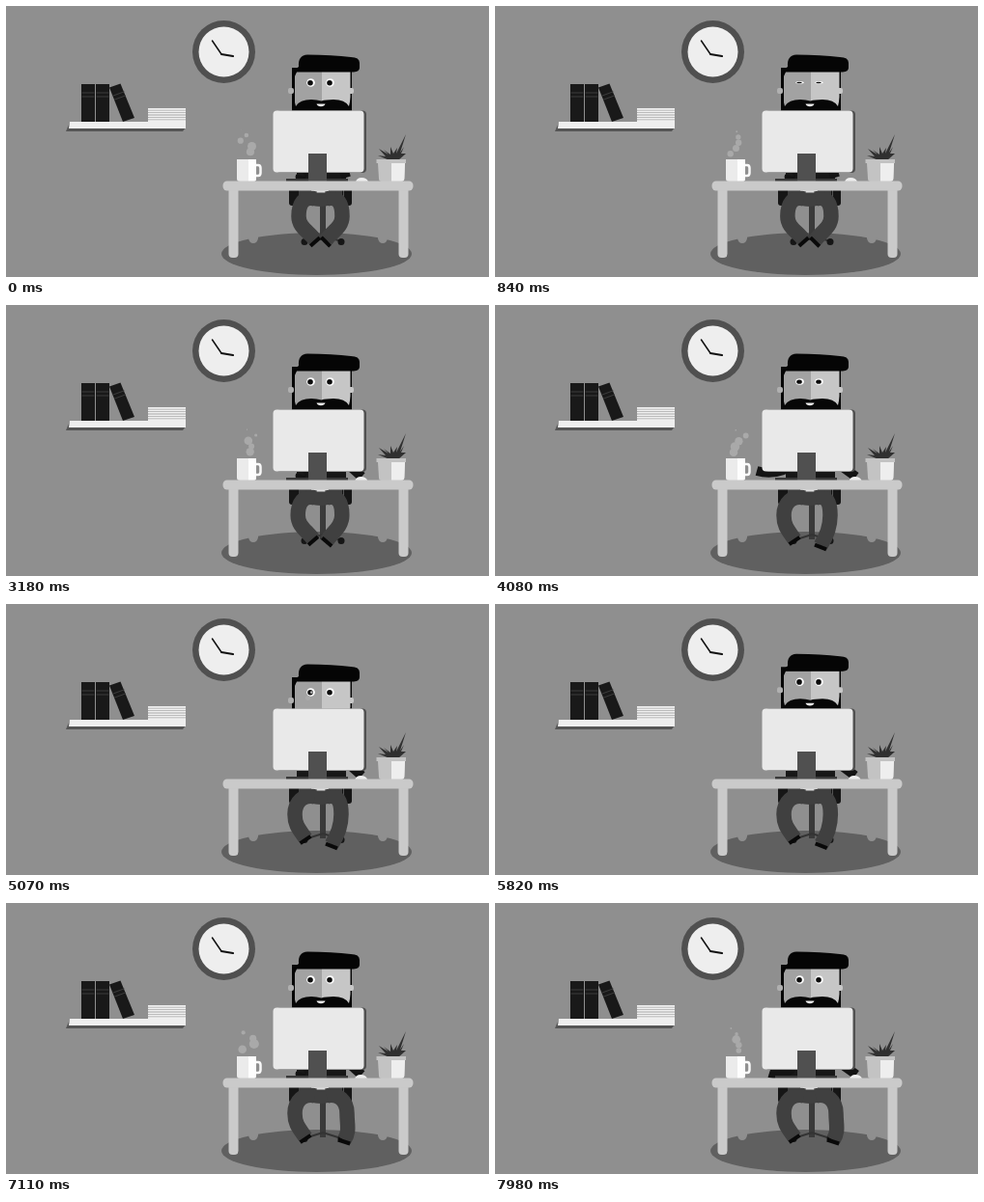
An HTML page for the animation above (8 s loop, 500 by 281 pixels).

```html
<!DOCTYPE html>
<html lang="en">
<head>
<meta charset="utf-8">
<title>At the desk</title>
<style>
html, body { margin: 0; width: 100%; height: 100%; overflow: hidden; background: #8f8f8f; }
svg { display: block; width: 100vw; height: 100vh; }
.line { fill: none; stroke-linecap: round; }
.sleeve { fill: none; stroke: #131313; stroke-width: 10; }
.trouser { fill: none; stroke: #404040; stroke-width: 15.5; }
.shoe { stroke: #090909; stroke-width: 4; }
</style>
</head>
<body>
<svg viewBox="0 0 500 281">
  <ellipse cx="321.500" cy="257" rx="98.500" ry="22" fill="#606060"/>

  <g id="clock">
    <circle cx="225.500" cy="47.500" r="32.500" fill="#505050"/>
    <circle cx="225.500" cy="47.500" r="26" fill="#eee"/>
    <path class="line" d="M223 50L213.500 36" stroke="#111" stroke-width="1.500"/>
    <path class="line" d="M223 50L235 52" stroke="#111" stroke-width="2"/>
  </g>

  <g id="shelf">
    <path d="M66 121L62 130H183L186 126Z" fill="#555"/>
    <path d="M66 120H186V127H65Z" fill="#eee"/>
    <path id="book" d="M78 81H92V120H78Z" fill="#191919"/>
    <use href="#book" x="15"/>
    <path d="M107 84.500L118.500 80.500L133 116L121 120Z" fill="#191919"/>
    <path class="line" d="M79 90H91M79 94H91M94 90H106M94 94H106M111 93L122 89M112.500 97L123.500 93" stroke="#3c3c3c"/>
    <path d="M147.500 106H186V120H147.500Z" fill="#a8a8a8"/>
    <path d="M166.500 106V120" stroke="#f0f0f0" stroke-width="39" stroke-dasharray="1.700 .760"/>
  </g>

  <g id="chair">
    <path d="M325 204H331V243H325Z" fill="#3a3a3a"/>
    <path class="line" d="M309 244L328 238L347 244" stroke="#333" stroke-width="2"/>
    <circle cx="309" cy="244.500" r="3.500" fill="#161616"/>
    <circle cx="347" cy="244.500" r="3.500" fill="#161616"/>
    <path d="M293 186H358V204Q358 207 355 207H296Q293 207 293 204Z" fill="#161616"/>
    <path d="M349.500 190V206" stroke="#555"/>
    <path d="M303 191H348V201Q336 208 326 208Q314 208 303 201Z" fill="#404040"/>
    <path d="M316 188H334V193.500H316Z" fill="#ddd"/>
  </g>
  <path id="legL" class="trouser"/>
  <path id="legR" class="trouser"/>
  <path id="shoeL" class="shoe" d="M-6.500 0H6.500"/>
  <path id="shoeR" class="shoe" d="M-6.500 0H6.500"/>

  <path d="M301 112H352V184H301Z" fill="#171717"/>
  <g id="head">
    <path d="M296 64H358V122H296Z" fill="#070707"/>
    <rect x="292" y="85" width="6" height="6" rx="2" fill="#b0b0b0"/>
    <rect x="354" y="85" width="6" height="6" rx="2" fill="#c8c8c8"/>
    <path d="M299 68H327V110H299Z" fill="#a2a2a2"/>
    <path d="M327 68H356.500V110H327Z" fill="#c6c6c6"/>
    <path d="M297 92L300 104Q304 97 316 97Q322 97 326.500 98.500Q331 97 339 97Q351 97 355 104L357.500 92V122H297Z" fill="#070707"/>
    <path d="M321.500 101.500H330.500Q329.500 104.300 326 104.300Q322.500 104.300 321.500 101.500Z" fill="#eee"/>
    <path d="M296 74Q296 67 303 63Q302 51 312 50.500Q338 50.500 357 53Q366 53 366 59V64Q366 68 360 68.500H301L298 75Z" fill="#050505"/>
    <g id="eyes">
      <g id="eye">
        <circle cx="315.500" cy="79.500" r="4.300" fill="#fff"/>
        <circle cx="315" cy="79.700" r="2.800" fill="#0b0b0b"/>
      </g>
      <use href="#eye" x="20"/>
    </g>
  </g>

  <g id="steam" fill="#a9a9a9"></g>
  <path id="armL" class="sleeve"/>
  <path id="armR" class="sleeve"/>
  <g id="mug">
    <path class="line" d="M258 165H261Q263.500 165 263.500 168V173Q263.500 176 261 176H258" stroke="#f8f8f8" stroke-width="2.500"/>
    <path d="M239 159H259V179Q259 182 256 182H242Q239 182 239 179Z" fill="#ebebeb"/>
    <path d="M251 159H259V179Q259 182 256 182H251Z" fill="#fdfdfd"/>
  </g>
  <path id="handR" d="M-6 3Q-5 -1.500 0 -1.500Q6 -1.500 7 3Z" fill="#eee"/>

  <g id="monitor">
    <rect x="280" y="108.500" width="93" height="64.500" rx="4" fill="#505050"/>
    <rect x="276.500" y="108.500" width="94" height="64" rx="4" fill="#e9e9e9"/>
    <path d="M290 179H354V182H290Z" fill="#3a3a3a"/>
    <path d="M313 153H332V182H313Z" fill="#505050"/>
  </g>

  <g id="plant">
    <path d="M397 160L385 155L393 156L386 148L396 154L391 149L398 154L398 146L401 153L405 147L404 153L414 133L408 152L412 146L409 153L414 153L406 160Z" fill="#303030"/>
    <path d="M383.500 159H414V163H413L412 179Q412 182 409 182H389Q386 182 386 179L385 163H383.500Z" fill="#c3c3c3"/>
    <path d="M399 163H413L412.500 179Q412 182 409 182H399Z" fill="#eee"/>
  </g>

  <g id="desk" fill="#cacaca">
    <path d="M251 238H261V241Q260 246 256 246Q252 246 251 241ZM385 238H395V241Q394 246 390 246Q386 246 385 241Z" fill="#8f8f8f"/>
    <rect x="230.500" y="184" width="10" height="77" rx="4"/>
    <rect x="406.500" y="184" width="10" height="77" rx="4"/>
    <rect x="224.500" y="181.500" width="197" height="10" rx="4.500"/>
  </g>
</svg>
<script>
const LOOP = 8000;
const PUFF_GAP = 230, PUFF_LIFE = 1200, PUFF_COUNT = 6;
const BLINK_EVERY = 1600, BLINK_AT = 820, BLINK_HALF = 80;

const $ = id => document.getElementById(id);
const set = (id, attr, value) => $(id).setAttribute(attr, value);
const mix = (a, b, p) => a + (b - a) * p;
const ramp = (t, from, to) => {
  const p = Math.max(0, Math.min(1, (t - from) / (to - from)));
  return p * p * (3 - 2 * p);
};
const random = seed => {
  const x = Math.sin(seed * 127.1 + 11.7) * 43758.5453;
  return x - Math.floor(x);
};

// How far the mug is from the desk (0) to the mouth (1).
const mugLift = t => ramp(t, 4200, 4980) - ramp(t, 5500, 6520);

for (let i = 0; i < PUFF_COUNT; i++)
  $("steam").append(document.createElementNS("http://www.w3.org/2000/svg", "circle"));

function drawSteam(t, mugX, mugY) {
  const newest = Math.floor(t / PUFF_GAP);
  [...$("steam").children].forEach((puff, i) => {
    const n = newest - i;
    const age = (t - n * PUFF_GAP) / PUFF_LIFE;
    const visible = age < 1 && mugLift(n * PUFF_GAP) < .3;
    const size = mix(3, 5.5, random(n + .5));
    puff.setAttribute("r", visible ? size * Math.sin(Math.PI * age ** .6) : 0);
    puff.setAttribute("cx", mix(243, 256, random(n)) + mix(-5, 7, random(n + .25)) * age + mugX);
    puff.setAttribute("cy", 157 - 30 * age + mugY);
  });
}

function drawLeg(side, hipX, { knee, x, y, angle }) {
  const out = side === "L" ? -6 : 6;
  set("leg" + side, "d", `M${hipX} 200C${hipX + 2 * out} 197 ${knee} 205 ${knee} 218` +
    `C${knee} 230 ${x + out} ${y - 9} ${x} ${y}`);
  set("shoe" + side, "transform", `translate(${x} ${y + 1.5}) rotate(${angle})`);
}

const mixPose = (a, b, p) =>
  Object.fromEntries(Object.keys(a).map(key => [key, mix(a[key], b[key], p)]));

const left = {
  crossed: { knee: 303, x: 320, y: 243, angle: -42 },
  apart: { knee: 299, x: 310, y: 243, angle: -34 }
};
const right = {
  crossed: { knee: 348, x: 331, y: 243, angle: 45 },
  forward: { knee: 347, x: 337, y: 249.5, angle: 22 },
  apart: { knee: 353, x: 350, y: 246, angle: 18 }
};

function drawLegs(t) {
  const uncross = mix(.2 * ramp(t, 0, 3200), 1, ramp(t, 3300, 3950));
  const spread = ramp(t, 5750, 6250);
  drawLeg("L", 320, mixPose(left.crossed, left.apart, uncross));
  drawLeg("R", 332, mixPose(mixPose(right.crossed, right.forward, uncross), right.apart, spread));
}

function drawArms(t, mugX, mugY) {
  const reach = ramp(t, 3450, 4000) - ramp(t, 6520, 7000);
  const handX = mix(mix(305, 284, ramp(t, 7200, 7600)), 271 + mugX, reach);
  const handY = mix(176, 172 + mugY, reach);
  set("armL", "d", `M312 163Q${mix(303, 293, reach)} ${handY + 6} ${handX} ${handY}`);

  const onMouse = ramp(t, 2500, 3100);
  const nudge = onMouse * 3 * Math.sin(t / 300);
  set("armR", "d", `M346 158L${mix(352, 371, onMouse) + nudge} 178`);
  set("handR", "transform", `translate(${368 + 2 * onMouse + nudge} 179.500)`);
}

function drawHead(t) {
  const drop = 12 * (ramp(t, 4450, 4950) - ramp(t, 5500, 5900));
  const sinceBlink = Math.abs(t % BLINK_EVERY - BLINK_AT);
  const open = Math.max(.05, Math.min(1, sinceBlink / BLINK_HALF));
  set("head", "transform", `translate(0 ${drop})`);
  set("eyes", "transform", `translate(0 79.500) scale(1 ${open}) translate(0 -79.500)`);
}

function draw(now) {
  const t = now % LOOP;
  const lift = mugLift(t);
  const mugX = 60 * lift, mugY = -42 * lift;
  const tilt = 10 * Math.min(1, 9 * lift);
  set("mug", "transform", `translate(${mugX} ${mugY}) rotate(${tilt} 249 171)`);
  drawSteam(t, mugX, mugY);
  drawArms(t, mugX, mugY);
  drawLegs(t);
  drawHead(t);
}

const start = performance.now();
function tick() {
  draw(performance.now() - start);
  requestAnimationFrame(tick);
}
tick();
</script>
</body>
</html>
```
